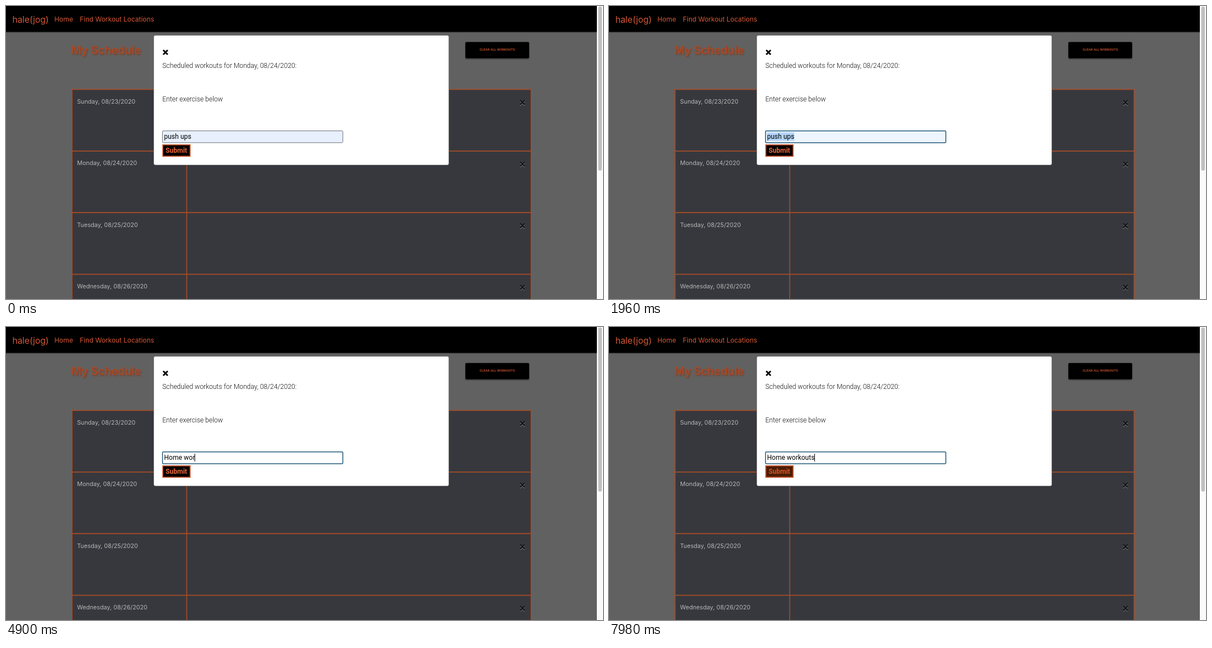
An HTML page for the animation above (8000 ms loop, 1067 px wide and 525 px high).

```html
<!DOCTYPE html>
<html lang="en">
<head>
<meta charset="utf-8">
<title>Workout schedule</title>
<style>
  html, body { margin: 0; width: 100%; height: 100%; overflow: hidden; background: #616161; }
  svg { display: block; width: 1067px; height: 525px; }
  text { font-family: Inter, sans-serif; white-space: pre; }
  .nav { fill: #d75835; font-size: 11.9px; }
  .day { fill: #b6b6b8; font-size: 10.7px; }
  .modal text, .clear { font-family: Roboto, sans-serif; font-size: 12px; }
  .modal .light { font-weight: 300; fill: #111; }
  .modal .submit { font-weight: 700; }
  text.clear { font-size: 5.9px; font-weight: 700; fill: #b84a2a; }
</style>
</head>
<body>
<svg viewBox="0 0 1067 525">
  <defs>
    <path id="cross" d="M-4-4L4 4M4-4L-4 4"/>
    <filter id="soft" x="-10%" y="-30%" width="120%" height="180%">
      <feGaussianBlur stdDeviation="1"/>
    </filter>
  </defs>
  <rect width="1067" height="525" fill="#616161"/>
  <rect width="1056" height="48" fill="#505050"/>
  <rect width="1056" height="46.5"/>
  <text class="nav" x="11.5" y="29.5" style="font-size:15.5px">hale(jog)</text>
  <text class="nav" x="86.5" y="28">Home</text>
  <text class="nav" x="132" y="28">Find Workout Locations</text>

  <g font-size="19.8" font-weight="600">
    <text x="118" y="87.5" fill="#6f4432" filter="url(#soft)">My Schedule</text>
    <text x="116.5" y="86" fill="#a84826">My Schedule</text>
  </g>
  <rect x="821" y="66" width="114" height="29" rx="2" fill="#333" filter="url(#soft)"/>
  <rect x="821" y="64.5" width="114" height="29" rx="2"/>
  <text class="clear" x="878" y="80" text-anchor="middle">CLEAR ALL WORKOUTS</text>

  <g id="table"></g>

  <rect x="1056" width="11" height="525" fill="#fafafa"/>
  <rect x="1058.5" y="1" width="6.5" height="294" rx="3.2" fill="#c1c1c1"/>

  <g class="modal">
    <rect x="264" y="52.5" width="527.5" height="232.5" rx="3" fill="#fff" stroke="#4c4c4c" stroke-width=".6"/>
    <use href="#cross" x="285" y="83" stroke="#000" stroke-width="2.8"/>
    <text class="light" x="279.5" y="111">Scheduled workouts for Monday, 08/24/2020:</text>
    <text class="light" x="279.5" y="170.5">Enter exercise below</text>
    <rect id="field" x="279.7" y="223.7" width="322.3" height="21.2" rx="1.5"/>
    <rect id="selection" x="282.5" y="226.5" height="15" fill="#b5d5fb"/>
    <text id="value" x="282.5" y="238"></text>
    <rect id="caret" y="227" width="1" height="14"/>
    <rect id="button" x="280.3" y="248.8" width="48.7" height="20.4" stroke="#c5532a" stroke-width="1.8"/>
    <text id="label" class="submit" x="304.4" y="262.7" text-anchor="middle">Submit</text>
  </g>
</svg>
<script>
const $ = id => document.getElementById(id);
const LOOP = 8000, FOCUS = 280, SELECT = 420, HOVER = 7770, FADE = 150, BLINK = 490;
const phrase = "Home workouts";
// Moment at which each letter of the phrase is typed.
const keys = [2240, 2450, 2660, 3220, 4200, 4480, 4760, 4900, 5250, 5880, 6370, 6720, 6860];

const days = ["Sunday, 08/23/2020", "Monday, 08/24/2020", "Tuesday, 08/25/2020", "Wednesday, 08/26/2020"];
$("table").innerHTML = days.map((day, i) => {
  const y = 149.5 + i * 110.4;
  return `<rect x="118" y="${y}" width="820.5" height="110.4" fill="#37383d" stroke="#a84c27" stroke-width="1.6"/>
    <path d="M323 ${y}v110.4" stroke="#a84c27" stroke-width="1.6"/>
    <text class="day" x="127" y="${y + 25.5}">${day}</text>
    <use href="#cross" x="923" y="${y + 24.7}" stroke="#77787b" stroke-width="2"/>
    <use href="#cross" x="923" y="${y + 23.5}" stroke="#111" stroke-width="2"/>`;
}).join("");

const set = (id, attrs) => {
  for (const name in attrs) $(id).setAttribute(name, attrs[name]);
};
const mix = (from, to, k) => `rgb(${from.map((c, i) => Math.round(c + (to[i] - c) * k))})`;

function draw(t) {
  const typed = keys.filter(k => k <= t).length;
  const focused = t >= FOCUS, selected = t >= SELECT && !typed;
  $("value").textContent = typed ? phrase.slice(0, typed) : "push ups";
  const width = $("value").getComputedTextLength();

  set("field", {
    fill: typed ? "#fff" : focused ? "#edf5ff" : "#e8f0fe",
    stroke: focused ? "#235a7c" : "#6d7078",
    "stroke-width": focused ? 1.5 : 1
  });
  set("selection", { width, opacity: +selected });

  const since = t - (typed ? keys[typed - 1] : FOCUS);
  const caretOn = focused && !selected && Math.floor(since / BLINK) % 2 === 0;
  set("caret", { x: Math.round(282 + width), opacity: +caretOn });

  const hover = Math.min(1, Math.max(0, (t - HOVER) / FADE));
  set("button", { fill: mix([0, 0, 0], [75, 29, 4], hover) });
  set("label", { fill: mix([238, 102, 58], [218, 83, 38], hover) });
}

function frame() {
  draw(performance.now() % LOOP);
  requestAnimationFrame(frame);
}
frame();
</script>
</body>
</html>
```
